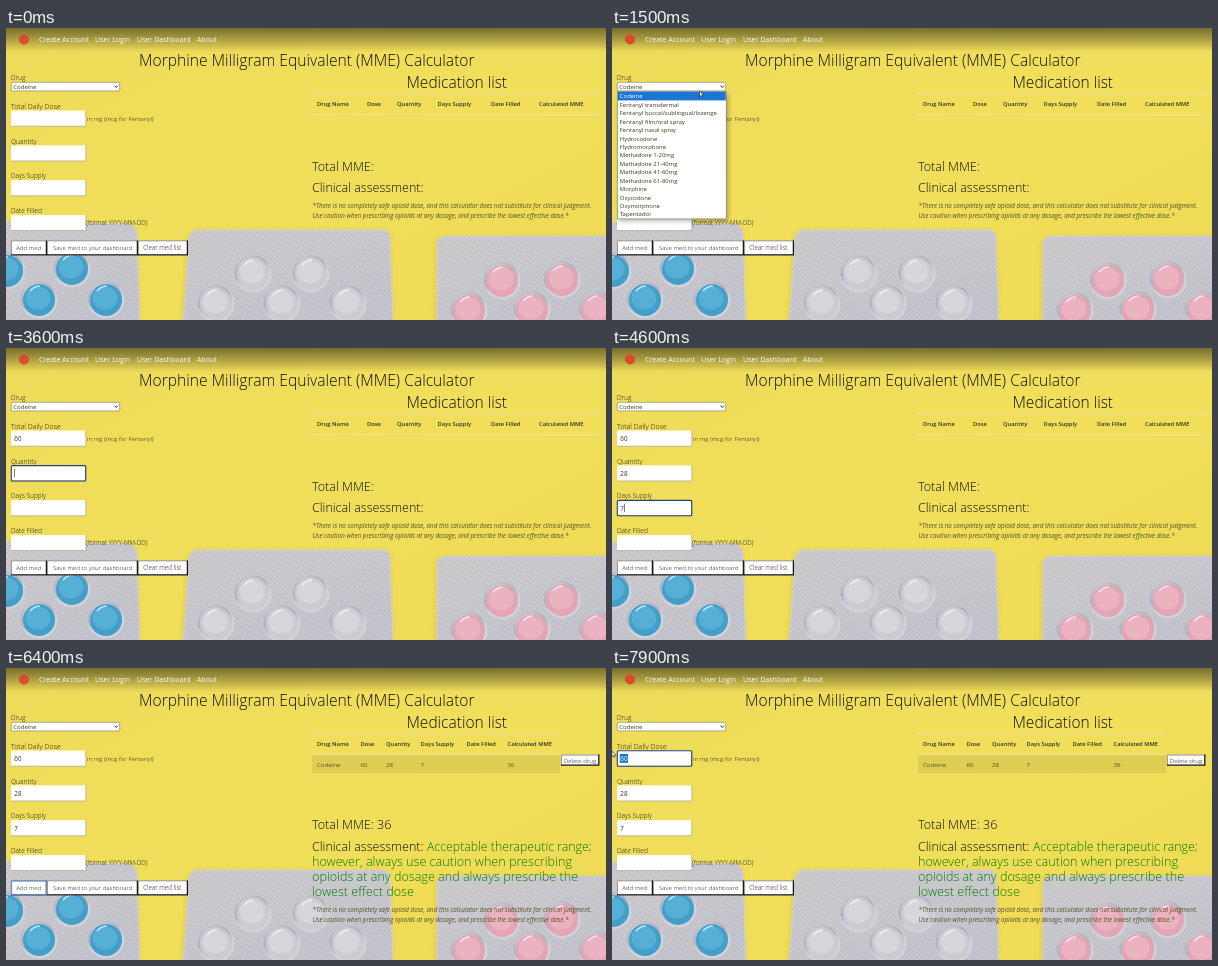
An HTML page for the animation above (8 s loop, 600 px wide and 292 px high).

```html
<!DOCTYPE html>
<html lang="en">
<head>
<meta charset="utf-8">
<title>MME Calculator</title>
<style>
  html, body { margin: 0; width: 100%; height: 100%; overflow: hidden; background: #efdc58; }
  svg { display: block; width: 100vw; height: 100vh; }
  text { font-family: "Open Sans", "Noto Sans", sans-serif; white-space: pre; fill: #3b3920; }
  .head { font-weight: 300; fill: #0c0e12; }
  .form { font-weight: 300; fill: #1c1b10; }
  .th { font-weight: 600; fill: #33321f; }
  .note { font-style: italic; fill: #55512c; }
  .nav { fill: #fff; }
  .good { font-weight: 300; fill: #007a00; }
  .cell { fill: #57502b; }
</style>
</head>
<body>
<svg id="stage" viewBox="0 0 600 292" preserveAspectRatio="none">
  <defs>
    <linearGradient id="wall" x2="1" y2="1">
      <stop offset="0" stop-color="#eedb59"/>
      <stop offset=".45" stop-color="#f1df5b"/>
      <stop offset="1" stop-color="#efda53"/>
    </linearGradient>
    <linearGradient id="bar" x2="0" y2="1">
      <stop offset="0" stop-color="#3a3418" stop-opacity=".66"/>
      <stop offset=".5" stop-color="#3a3418" stop-opacity=".36"/>
      <stop offset="1" stop-color="#3a3418" stop-opacity="0"/>
    </linearGradient>
    <linearGradient id="foil" x2=".5" y2="1">
      <stop offset="0" stop-color="#c6c4c6"/>
      <stop offset=".5" stop-color="#c3c2c8"/>
      <stop offset="1" stop-color="#bdbdc6"/>
    </linearGradient>
    <pattern id="grain" width="3" height="3" patternUnits="userSpaceOnUse" patternTransform="rotate(35)">
      <path d="M0 .5H3M.5 0V3" stroke="#fff" stroke-opacity=".2" stroke-width=".6"/>
    </pattern>
    <radialGradient id="bubble" cx=".45" cy=".4">
      <stop offset=".6" stop-color="#d3d3d9"/>
      <stop offset=".88" stop-color="#acaeb9"/>
      <stop offset="1" stop-color="#d2d3d9"/>
    </radialGradient>
    <filter id="soft"><feGaussianBlur stdDeviation="2.5"/></filter>
  </defs>
</svg>
<script>
const NS = "http://www.w3.org/2000/svg";
const stage = document.getElementById("stage");
const LOOP = 8000;

function add(parent, tag, attrs = {}, text) {
  const el = document.createElementNS(NS, tag);
  for (const k in attrs) el.setAttribute(k, attrs[k]);
  if (text !== undefined) el.textContent = text;
  parent.append(el);
  return el;
}
const group = parent => add(parent, "g");
const rect = (p, x, y, width, height, fill, more) =>
  add(p, "rect", { x, y, width, height, fill, ...more });
const path = (p, d, more) => add(p, "path", { d, fill: "none", ...more });
// y is the middle of the capital letters
const label = (p, x, y, size, str, cls = "") =>
  add(p, "text", { x, y: y + size * .35 + .3, "font-size": size, class: cls }, str);
const show = (el, on) => el.setAttribute("visibility", on ? "visible" : "hidden");

// Backdrop
rect(stage, 0, 0, 600, 292, "url(#wall)");

function pack(outline, colour, light, pills) {
  path(stage, outline, { fill: "#a08a2a", opacity: .3, filter: "url(#soft)", transform: "translate(-1 1)" });
  path(stage, outline, { fill: "url(#foil)" });
  path(stage, outline, { fill: "url(#grain)", stroke: "#d3d2d2", "stroke-width": 1 });
  for (const [cx, cy] of pills) {
    add(stage, "circle", { cx, cy, r: 18.5, fill: "url(#bubble)" });
    add(stage, "circle", { cx, cy, r: 16, fill: colour });
    add(stage, "ellipse", { cx: cx - 1, cy: cy - 2, rx: 12.5, ry: 11.5, fill: light, opacity: .75 });
    path(stage, `M${cx - 9} ${cy - 9}q4-5 10-5`, { stroke: "#fff", "stroke-width": 1.5, opacity: .7 });
  }
}
pack("M-5 194L122 196Q131 197 131 206L134 297H-5Z", "#429fca", "#5eb4d8",
  [[1, 243], [66, 241], [33, 272], [100, 272]]);
pack("M192 202H376Q384 202 384 210L387 297H177L183 211Q184 202 192 202Z", "#cbcbd2", "#dadadf",
  [[247, 246], [305, 246], [210, 276], [276, 276], [342, 276]]);
pack("M440 208H605V297H431V217Q431 208 440 208Z", "#e3a5b4", "#edb7c3",
  [[496, 253], [556, 252], [463, 283], [526, 282], [591, 282]]);

// Navigation
rect(stage, 0, 0, 600, 24, "url(#bar)");
add(stage, "circle", { cx: 18, cy: 11.5, r: 5, fill: "#dc4a2c" });
[[33, "Create Account"], [89, "User Login"], [131, "User Dashboard"], [191, "About"]]
  .forEach(([x, s]) => label(stage, x, 11, 7.05, s, "nav"));

label(stage, 133, 32.2, 15.63, "Morphine Milligram Equivalent (MME) Calculator", "head");
label(stage, 400.5, 54.2, 15.5, "Medication list", "head");

// Form
label(stage, 5, 49.4, 6.5, "Drug", "form");
rect(stage, 5.3, 54.3, 108.4, 8.6, "#fff", { stroke: "#77775f", "stroke-width": .6, rx: .8 });
label(stage, 7.3, 58.5, 6, "Codeine");
path(stage, "M108.6 57.7l1.7 1.8l1.7-1.8", { stroke: "#222", "stroke-width": .9 });

function field(name, y, size) {
  label(stage, 5, y - 4.5, size, name, "form");
  rect(stage, 5, y, 75, 15.6, "#fff");
  path(stage, `M5 ${y + 15.6}H79.8V${y}`, { stroke: "#99957a", "stroke-width": .6 });
  const mark = rect(stage, 7.8, y + 3.4, 8.2, 8.8, "#1a76d2");
  const text = label(stage, 8.3, y + 7.8, 6.3, "");
  const ring = rect(stage, 5.3, y + .2, 74.4, 15.4, "none", { stroke: "#2b4170", "stroke-width": 1.1, rx: 1 });
  const caret = rect(stage, 8.4, y + 3.6, .6, 8.4, "#222");
  return { mark, text, ring, caret };
}
const fields = [
  field("Total Daily Dose", 82.6, 7),
  field("Quantity", 117.4, 6.65),
  field("Days Supply", 152.2, 6.45),
  field("Date Filled", 187, 6.55)
];
label(stage, 81, 90.5, 6.2, "in mg (mcg for Fentanyl)", "form");
label(stage, 80.3, 194.9, 6.3, "(format YYYY-MM-DD)", "form");

function button(p, x, y, w, h, str, size, pad) {
  rect(p, x, y, w, h, "#fff");
  path(p, `M${x + .4} ${y + h}V${y + .4}H${x + w}`, { stroke: "#77756a", "stroke-width": .8 });
  path(p, `M${x} ${y + h - .6}H${x + w - .6}V${y}`, { stroke: "#111", "stroke-width": 1.3 });
  label(p, x + pad, y + h / 2, size, str, "form");
}
button(stage, 5, 212.4, 36, 15, "Add med", 6.15, 5.2);
button(stage, 41, 212.4, 91, 15, "Save med to your dashboard", 6.15, 6);
button(stage, 132, 212.4, 50, 15, "Clear med list", 6.25, 5.2);
const addRing = rect(stage, 5.5, 212.9, 35, 14, "none", { stroke: "#6f8fc4", "stroke-width": 1.3, rx: .6 });

// Medication table and assessment
const columns = ["Drug Name", "Dose", "Quantity", "Days Supply", "Date Filled", "Calculated MME"];
function table(p, xs, right) {
  path(p, `M306 66H${right}M306 86.6H${right}`, { stroke: "#e8e3bd", "stroke-width": .8 });
  columns.forEach((s, i) => label(p, xs[i], 76, 5.75, s, "th"));
}
function notes(p, y) {
  label(p, 306.5, y, 6.25, "*There is no completely safe opioid dose, and this calculator does not substitute for clinical judgment.", "note");
  label(p, 306.5, y + 9.6, 6.25, "Use caution when prescribing opioids at any dosage, and prescribe the lowest effective dose.*", "note");
}

const blank = group(stage);
table(blank, [311, 361, 391, 431.5, 485, 533], 595);
label(blank, 306, 138.2, 12.6, "Total MME:", "head");
label(blank, 306, 159.7, 12.5, "Clinical assessment:", "head");
notes(blank, 177.8);

const result = group(stage);
const cols = [311, 354.5, 380, 414.5, 460.5, 501.5];
rect(result, 306, 87, 248, 18, "#000", { opacity: .075 });
table(result, cols, 554);
["Codeine", "60", "28", "7", "", "36"].forEach((s, i) => label(result, cols[i], 96.3, 6.1, s, "cell"));
button(result, 555, 86.6, 38.4, 11.2, "Delete drug", 6.15, 2.8);
label(result, 306, 156.7, 12.6, "Total MME: 36", "head");
label(result, 306, 178.7, 12.5, "Clinical assessment:", "head");
label(result, 421, 178.7, 12.3, "Acceptable therapeutic range;", "good");
["however, always use caution when prescribing",
 "opioids at any dosage and always prescribe the",
 "lowest effect dose"].forEach((s, i) => label(result, 306, 193.5 + i * 14.9, 12.6, s, "good"));
notes(result, 241.6);

// Open list of drugs
const menu = group(stage);
rect(menu, 7, 66, 109, 127, "#000", { opacity: .3, filter: "url(#soft)" });
rect(menu, 5.4, 63.3, 108.8, 127.6, "#fff", { stroke: "#74736a", "stroke-width": .6 });
rect(menu, 5.8, 63.8, 108, 8.6, "#1a76d2");
["Codeine", "Fentanyl transdermal", "Fentanyl buccal/sublingual/lozenge", "Fentanyl film/oral spray",
 "Fentanyl nasal spray", "Hydrocodone", "Hydromorphone", "Methadone 1-20mg", "Methadone 21-40mg",
 "Methadone 41-60mg", "Methadone 61-80mg", "Morphine", "Oxycodone", "Oxymorphone", "Tapentadol"]
  .forEach((s, i) => label(menu, 7.8, 68 + i * 8.43, 5.95, s, i ? "" : "nav"));

const pointer = path(stage, "M0 0V5.6L1.3 4.5L2.2 6.4L3 6L2.2 4.2H4Z",
  { fill: "#fff", stroke: "#222", "stroke-width": .6 });

// Time, focused item (-1 none, 4 = Add med), field values
const steps = [
  [0, -1, "", "", ""],
  [2400, 0, "", "", ""],
  [3000, 0, "6", "", ""],
  [3200, 0, "60", "", ""],
  [3500, 1, "60", "", ""],
  [3700, 1, "60", "2", ""],
  [3900, 1, "60", "28", ""],
  [4200, 2, "60", "28", ""],
  [4500, 2, "60", "28", "7"],
  [4800, 3, "60", "28", "7"],
  [5100, 4, "60", "28", "7"],
  [7400, 0, "60", "28", "7"]
];
const OPEN = 900, CLOSE = 2000, DONE = 5300, SELECT = 7600;

// Pointer legs: start, end, from, to
const legs = [
  [500, 900, [97, 75], [87.5, 63]],
  [900, 2000, [87.5, 63], [87.5, 63]],
  [2000, 2400, [87.5, 63], [40, 90]],
  [7000, 7400, [30, 110], [18, 91]],
  [7400, 7700, [18, 91], [0, 83]],
  [7700, 8000, [0, 83], [0, 83]]
];

function draw(t) {
  const [since, focus, ...values] = steps.findLast(s => s[0] <= t);
  fields.forEach((f, i) => {
    const value = values[i] || "";
    const on = focus === i;
    const marked = on && t >= SELECT;
    f.text.textContent = value;
    f.text.style.fill = marked ? "#fff" : "";
    show(f.mark, marked);
    show(f.ring, on);
    show(f.caret, on && !marked && (t - since) % 1000 < 500);
    f.caret.setAttribute("x", 8.4 + value.length * 3.6);
  });
  show(addRing, focus === 4);
  show(menu, t >= OPEN && t < CLOSE);
  show(blank, t < DONE);
  show(result, t >= DONE);

  const leg = legs.find(l => t >= l[0] && t < l[1]);
  show(pointer, leg);
  if (leg) {
    const [a, b, p, q] = leg;
    const k = (t - a) / (b - a), e = k * k * (3 - 2 * k);
    pointer.setAttribute("transform", `translate(${p[0] + (q[0] - p[0]) * e} ${p[1] + (q[1] - p[1]) * e})`);
  }
}

const start = performance.now();
function tick() {
  draw(Math.floor((performance.now() - start) % LOOP / 100) * 100);
  requestAnimationFrame(tick);
}
tick();
</script>
</body>
</html>
```
